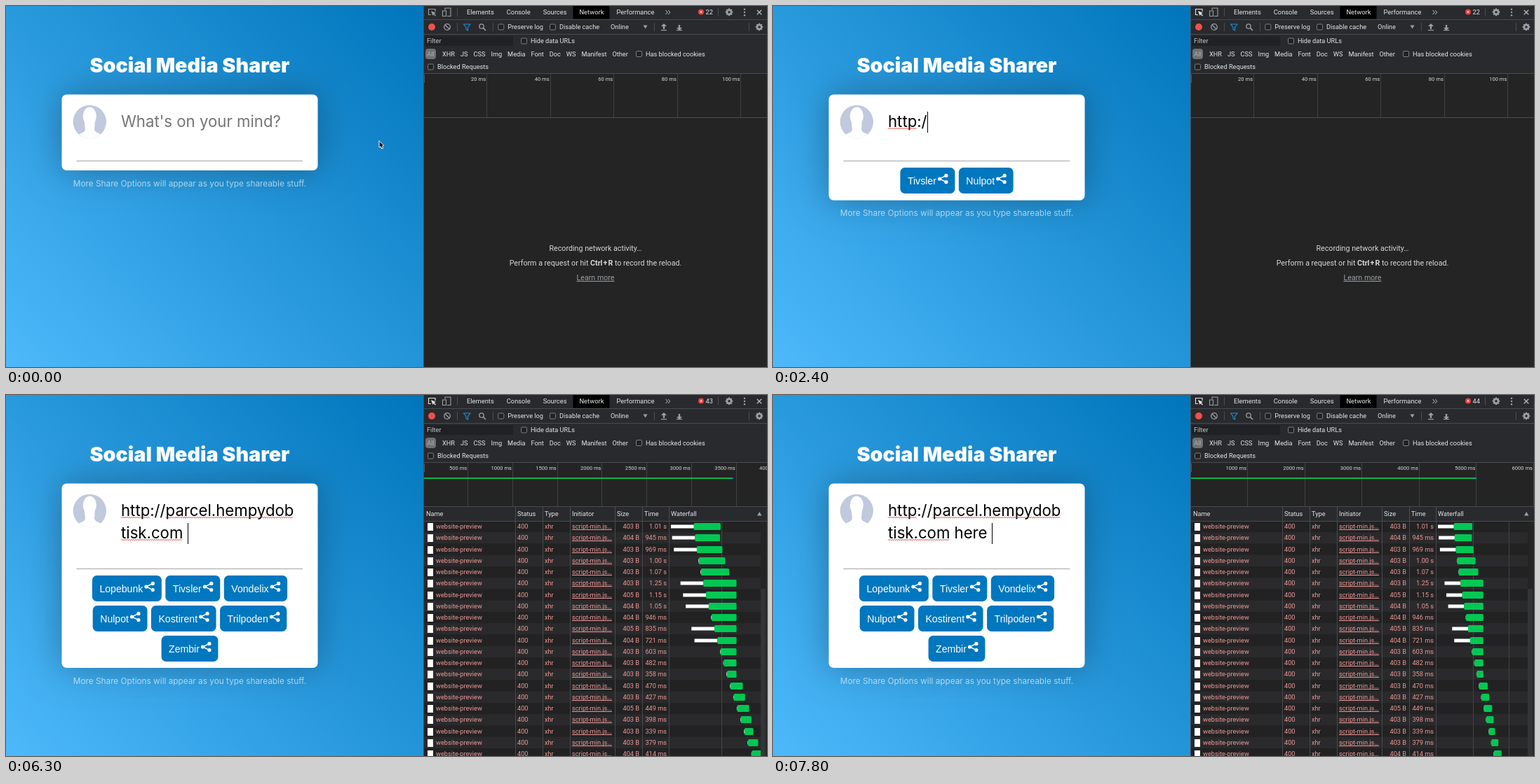
These frames come from a looping animation (1085x516 px, 8 s). An HTML page with a canvas:

```html
<!DOCTYPE html>
<html lang="en">
<head>
<meta charset="utf-8">
<title>Share box with network panel</title>
<style>
html, body { margin: 0; width: 100%; height: 100%; overflow: hidden; background: #242424; }
canvas { display: block; width: 1085px; height: 516px; }
</style>
</head>
<body>
<canvas id="stage"></canvas>
<script>
const W = 1085, H = 516, LOOP = 8000, SPLIT = 595, BUSY = 5400;
const canvas = document.getElementById('stage');
const c = canvas.getContext('2d');
const dpr = window.devicePixelRatio || 1;
canvas.width = W * dpr;
canvas.height = H * dpr;

const SANS = 'Inter, "Open Sans", sans-serif';
const UI = 'Roboto, "Liberation Sans", sans-serif';
const BTN = '"Liberation Sans", Arial, sans-serif';
const LIGHT = '#e3e5e8', GREY = '#9aa0a6', EDGE = '#494b4f', PINK = '#ee9896';

const LINES = ['http://parcel.hempydob', 'tisk.com here '];
const FEW = ['Tivsler', 'Nulpot'];
const ALL = ['Lopebunk', 'Tivsler', 'Vondelix', 'Nulpot', 'Kostirent', 'Trilpoden', 'Zembir'];
const COLS = { Name: 599, Status: 729, Type: 768, Initiator: 807, Size: 871, Time: 910, Waterfall: 948 };

// moments when the panel repaints, and the recording clock at a few of them
const REPAINTS = [5400, 5700, 6100, 6300, 6500, 6700, 6900, 7600, 7800];
const CLOCK = [[5400, 2010], [6300, 3463], [6900, 3953], [7800, 5000]];
const POINTER = [[400, 532, 192], [700, 367, 173], [1000, 367, 173], [1200, 607, 8]];

const clamp = (v, lo, hi) => Math.min(hi, Math.max(lo, v));
const within = (t, a, b) => t >= a && t < b;

// values on a polyline of [time, ...values]
function along(points, t) {
  let i = 0;
  while (i < points.length - 2 && t >= points[i + 1][0]) i++;
  const [a, b] = [points[i], points[i + 1]];
  const k = clamp((t - a[0]) / (b[0] - a[0]), 0, 1);
  return a.slice(1).map((v, j) => v + (b[j + 1] - v) * k);
}
function noise(n) {
  const v = Math.sin(n * 12.9898) * 43758.5453;
  return v - Math.floor(v);
}
function keyCount(t) {
  if (t < BUSY) return clamp(Math.ceil((t - 1400) / 160), 0, 6);
  if (t >= 7000) return 31 + clamp(Math.ceil((t - 7000) / 150), 0, 5);
  return t < 5700 ? 25 : t < 6100 ? 26 : t < 6300 ? 28 : 31;
}

/* ---- drawing helpers ---- */

function rect(x, y, w, h, fill) {
  c.fillStyle = fill;
  c.fillRect(x, y, w, h);
}
function round(x, y, w, h, r, fill) {
  c.beginPath();
  c.roundRect(x, y, w, h, r);
  c.fillStyle = fill;
  c.fill();
}
function disc(x, y, r, fill) {
  c.beginPath();
  c.arc(x, y, r, 0, 7);
  c.fillStyle = fill;
  c.fill();
}
function ring(x, y, r, color, w) {
  c.beginPath();
  c.arc(x, y, r, 0, 7);
  c.strokeStyle = color;
  c.lineWidth = w;
  c.stroke();
}
function path(pts, color, w, closed) {
  c.beginPath();
  pts.forEach(([x, y]) => c.lineTo(x, y));
  if (closed) c.closePath();
  c.strokeStyle = color;
  c.lineWidth = w;
  c.stroke();
}
function poly(pts, fill) {
  c.beginPath();
  pts.forEach(([x, y]) => c.lineTo(x, y));
  c.fillStyle = fill;
  c.fill();
}
function write(s, x, y, font, color, align = 'left') {
  c.font = font;
  c.fillStyle = color;
  c.textAlign = align;
  c.fillText(s, x, y);
}
function widthOf(s, font) {
  c.font = font;
  return c.measureText(s).width;
}
// panel text, placed by the middle of its capitals
function ui(s, x, y, color = LIGHT, align = 'left', size = 9.2) {
  write(s, x, y + size * 0.355, size + 'px ' + UI, color, align);
}
function flow(words, x, y, gap, size) {
  words.split(' ').forEach(s => {
    ui(s, x, y, LIGHT, 'left', size);
    x += widthOf(s, size + 'px ' + UI) + gap;
  });
}

/* ---- share page ---- */

function backdrop() {
  const g = c.createLinearGradient(19.75, 535.75, 575.25, -19.75);
  g.addColorStop(0, '#4db9fb');
  g.addColorStop(1, '#0075bb');
  rect(0, 0, SPLIT, H, g);
}

function avatar() {
  c.save();
  disc(119.3, 165.5, 23.7, '#c0c9dd');
  c.clip();
  c.beginPath();
  c.ellipse(119.3, 157.5, 9.6, 13, 0, 0, 7);
  c.fillStyle = '#fff';
  c.fill();
  poly([[111.5, 163], [113, 177], [111, 180], [104, 183.5], [102, 190],
    [137, 190], [135, 183.5], [128, 180], [126, 177], [127, 163]], '#fff');
  c.restore();
}

function shareIcon(x, y) {
  path([[x + 12, y - 4.6], [x + 2.6, y], [x + 12, y + 4.6]], '#fff', 1.5);
  [[12, -4.6], [2.6, 0], [12, 4.6]].forEach(([dx, dy]) => disc(x + dx, y + dy, 2.6, '#fff'));
}

// wraps the buttons into rows
function wrap(labels) {
  const rows = [];
  let room = 0;
  labels.forEach(label => {
    const w = widthOf(label, '14.1px ' + BTN) + 37;
    if (w > room) {
      rows.push([]);
      room = 322;
    }
    rows[rows.length - 1].push({ label, w });
    room -= w + 5.5;
  });
  return rows;
}

function buttons(rows, top) {
  rows.forEach((row, i) => {
    const y = top + i * 43;
    let x = 262 - (row.reduce((sum, b) => sum + b.w + 5.5, -5.5)) / 2;
    row.forEach(({ label, w }) => {
      round(x, y, w, 37, 6.5, '#0077be');
      write(label, x + 10.5, y + 23.5, '14.1px ' + BTN, '#fff');
      shareIcon(x + w - 24.5, y + 16);
      x += w + 5.5;
    });
  });
}

function squiggle(x, w, y) {
  const pts = [];
  for (let i = 0; i * 1.5 <= w; i++) pts.push([x + i * 1.5, y + (i % 2 ? 1.6 : 0)]);
  path(pts, '#e8302a', 0.9);
}

function typed(t) {
  const n = keyCount(t), split = LINES[0].length, x = 164, y = 173;
  const parts = [LINES[0].slice(0, n), LINES[1].slice(0, Math.max(0, n - split))];
  const font = '22.2px ' + SANS;
  const width = s => widthOf(s, font);
  if (n) parts.forEach((s, i) => write(s, x, y + i * 32, font, '#000'));
  else write("What's on your mind?", x, y, font, '#757575');
  if (t >= 2400) squiggle(x, width('http'), y + 1.3);
  if (t >= 6300) {
    const lead = width('http://');
    squiggle(x + lead, width(LINES[0]) - lead, y + 1.3);
    squiggle(x, width('tisk.com'), y + 33.3);
  }
  if (t >= 800 && !within(t, 1400, 1500) && !within(t, 6900, 7100)) {
    const low = n > split ? 1 : 0;
    rect(Math.round(x + width(parts[low])), 151 + low * 32, 1, 30, '#000');
  }
}

function page(t) {
  const rows = wrap(t < 1500 ? [] : t < BUSY ? FEW : ALL);
  const rule = t < BUSY ? 221 : 248;
  const bottom = rule + 14 + rows.length * 42.7;
  backdrop();
  c.save();
  c.shadowColor = 'rgba(0,0,0,.3)';
  c.shadowBlur = 50 * dpr;
  round(79.5, 126.5, 365, bottom - 126.5, 7, '#fff');
  c.restore();
  write('Social Media Sharer', 262, 95, '900 28.7px ' + SANS, '#fff', 'center');
  avatar();
  rect(100.5, rule, 322.5, 1, '#a5a5a5');
  buttons(rows, rule + 10);
  write('More Share Options will appear as you type shareable stuff.', 262, bottom + 22.7,
    '11.8px ' + SANS, 'rgba(255,255,255,.62)', 'center');
  typed(t);
}

/* ---- network panel ---- */

function divider(x, y) {
  rect(x, y - 6, 1, 12, '#4b4d51');
}
function checkbox(x, y, label) {
  c.beginPath();
  c.roundRect(x - 4, y - 4, 8, 8, 1.5);
  c.fillStyle = '#202124';
  c.fill();
  c.strokeStyle = '#85888c';
  c.lineWidth = 0.9;
  c.stroke();
  ui(label, x + 9.5, y);
}
function gear(x, y) {
  for (let i = 0; i < 4; i++) {
    const dx = Math.cos(i * Math.PI / 4) * 5.3, dy = Math.sin(i * Math.PI / 4) * 5.3;
    path([[x - dx, y - dy], [x + dx, y + dy]], GREY, 2.2);
  }
  disc(x, y, 4.2, GREY);
  disc(x, y, 1.8, '#292a2d');
}
function cross(x, y, r, color, w) {
  path([[x - r, y - r], [x + r, y + r]], color, w);
  path([[x + r, y - r], [x - r, y + r]], color, w);
}
function transfer(x, y, dir) {
  path([[x, y - 3 * dir], [x, y + 3 * dir]], GREY, 2.4);
  poly([[x - 4, y - dir], [x + 4, y - dir], [x, y - 5 * dir]], GREY);
  rect(x - 4, y + 4, 8, 1.2, GREY);
}

function tabs(t, errors) {
  const pin = t < 1200 ? GREY : '#e4e6e9';
  path([[606, 12.5], [602.5, 12.5], [602.5, 4.5], [612, 4.5], [612, 8]], pin, 1.1);
  poly([[606, 7], [613, 10], [610.5, 11], [613, 13.5], [612, 14.5], [609.5, 12], [608.5, 14]], pin);
  path([[626, 6], [626, 3], [634, 3], [634, 14.5], [629, 14.5]], GREY, 1.1);
  path([[622.5, 7], [627.5, 7], [627.5, 14.5], [622.5, 14.5]], GREY, 1.1, true);
  divider(643, 8.5);
  rect(808.5, 0, 52, 18.5, '#000');
  flow('Elements Console Sources Network Performance', 657, 8.5, 18, 9.35);
  [940.5, 944].forEach(x => path([[x, 6], [x + 2.7, 9], [x, 12]], GREY, 1.1));
  disc(991, 8.5, 4, '#e8403c');
  cross(991, 8.5, 1.5, '#fff', 0.9);
  ui(String(errors), 997.5, 8.7);
  divider(1015, 8.5);
  gear(1031, 8.7);
  [4.8, 9, 13.2].forEach(y => disc(1053, y, 1.2, GREY));
  cross(1074, 9, 3.2, '#b5b8bc', 1.3);
}

function toolbar() {
  disc(607, 30, 5, '#f0504c');
  ring(629, 30, 4.3, GREY, 1.3);
  path([[626, 27], [632, 33]], GREY, 1.3);
  path([[652.5, 26], [662, 26], [658.5, 30.5], [658.5, 35], [656, 33.5], [656, 30.5]], '#1a8fdd', 1.1, true);
  ring(678, 29, 3.2, GREY, 1.3);
  path([[680.3, 31.4], [684, 35]], GREY, 1.6);
  checkbox(705.8, 30, 'Preserve log');
  checkbox(779.5, 30, 'Disable cache');
  ui('Online', 862, 30);
  poly([[908.5, 27.5], [914.5, 27.5], [911.5, 32.5]], GREY);
  transfer(938, 30, 1);
  transfer(960, 30, -1);
  gear(1074, 30);
  [643, 694, 924, 1059].forEach(x => divider(x, 30));
}

function filters() {
  rect(597, 43, 126, 14, '#202124');
  ui('Filter', 600, 50, '#c3c6ca');
  checkbox(738.5, 50, 'Hide data URLs');
  round(598, 61, 15, 15, 4, '#6f7174');
  ui('All', 605.5, 68.5, '#aeb0b3', 'center');
  flow('XHR JS CSS Img Media Font Doc WS Manifest Other', 622, 68.5, 8, 9.2);
  checkbox(902.5, 68.5, 'Has blocked cookies');
  checkbox(605.5, 87, 'Blocked Requests');
}

// smallest 1-2-5 step that leaves room for a label
function axisStep(pxPerMs) {
  for (let p = 10; ; p *= 10) {
    for (const m of [1, 2, 5]) if (p * m * pxPerMs >= 50) return p * m;
  }
}

// the axis widens by a quarter whenever the recording outgrows it
function overview(clock, busy) {
  const range = 2460 * 1.25 ** Math.ceil(Math.log(clock / 2460) / Math.log(1.25));
  const px = 490 / range, step = axisStep(px);
  rect(SPLIT, 97, 490, 62, '#242424');
  for (let ms = step; ms < range + step; ms += step) {
    const x = SPLIT + ms * px;
    rect(Math.floor(x), 97, 1, 62, '#3f4144');
    ui(ms + ' ms', x - 1.5, 104, '#d5d7da', 'right', 7.6);
  }
  rect(SPLIT, 98, 1.5, 12, '#85888c');
  if (busy) {
    rect(596, 118, clock * px - 1, 1.8, '#00c853');
    rect(SPLIT + clock * px - 3, 118, 3, 1.8, '#1a8ae8');
  }
}

function emptyNote() {
  const mid = 840.5, ink = '#d5d7da';
  const fonts = ['10.7px ' + UI, 'bold 10.7px ' + UI];
  const parts = ['Perform a request or hit ', 'Ctrl\u200a+\u200aR', ' to record the reload.'];
  const widths = parts.map((s, i) => widthOf(s, fonts[i % 2]));
  let x = mid - widths.reduce((a, b) => a + b) / 2;
  ui('Recording network activity…', mid, 346, ink, 'center', 10.7);
  parts.forEach((s, i) => {
    write(s, x, 370.8, fonts[i % 2], ink);
    x += widths[i];
  });
  ui('Learn more', mid, 388, GREY, 'center', 10.7);
  rect(813.5, 393, 54, 1, GREY);
}

// Six preflights, then requests that start ever further apart.
// Some wait for a free connection; those in the middle finish together.
function request(i) {
  const unit = 0.0505, early = i < 6;
  const start = early ? 11 + i * 6 : 44 + 111 * ((i - 6) / 20) ** 1.3;
  const ms = i < 11 ? 920 + noise(i) * 150 : i < 20 ? (125.5 - start) / unit : 310 + noise(i) * 210;
  const waits = !early && i < 17 && (i - 6) % 4.5 < 3;
  return {
    early, start, ms: Math.round(ms),
    end: start + ms * unit,
    queued: early ? start : start - (waits ? 44 : 1),
    bytes: early ? 0 : 403 + Math.floor(noise(i + 40) * 3)
  };
}

function bar(r, y, scale) {
  const [q, a, b] = [r.queued, r.start, r.end].map(v => 948 + v * scale);
  rect(q, y - 2.5, a - q, 5, '#fff');
  round(a, y - 5, b - a, 10, 1.5, '#00c853');
}

function row(r, y, pending) {
  const ink = r.early || pending ? LIGHT : PINK;
  const time = r.ms < 1000 ? r.ms + ' ms' : (r.ms / 1000).toFixed(2) + ' s';
  rect(601, y - 5, 8, 11, '#fff');
  ui('website-preview', 613, y, ink);
  ui(r.early ? '200' : pending ? '(pend…' : '400', COLS.Status, y, ink);
  ui(r.early ? 'json' : 'xhr', COLS.Type, y, ink);
  if (r.early) ui('Other', COLS.Initiator, y, GREY);
  else {
    ui('script-min.js…', COLS.Initiator, y, ink);
    rect(COLS.Initiator, y + 4, 57, 1, ink);
  }
  ui((pending ? 0 : r.bytes) + ' B', 903, y, ink, 'right');
  ui(pending ? 'Pendi…' : time, 942, y, ink, 'right');
}

function table(t, clock) {
  const pitch = 16.25, scale = Math.min(1, 2580 / clock);
  const scroll = clamp(keyCount(t) - 25, 0, 6);
  const gap = (scale > 0.9 ? 49.5 : 99) * scale;
  const lines = Object.values(COLS).slice(1).map(x => x - 3);
  const rows = Array.from({ length: 21 }, (_, k) => ({
    r: request(scroll + k), y: Math.round(188 + k * pitch), pending: k === 20 && t < 6300
  }));
  rows.forEach((_, k) => rect(596, 180 + k * pitch, 480, pitch, k + scroll & 1 ? '#2a2a2c' : '#222223'));
  for (let x = 947 + gap; x < 1076; x += gap) rect(Math.floor(x), 180, 1, H - 180, '#424447');
  lines.forEach(x => rect(x, 160, 1, H - 160, '#47494d'));
  rows.forEach(({ r, y, pending }) => {
    row(r, y, pending);
    if (!pending) bar(r, y, scale);
  });
  rect(1076, 180, 9, H - 180, '#242424');
  const top = 211 + scroll * 11;
  rect(1076, top, 7, H - top, '#333437');
  rect(SPLIT, 160, 490, 20, '#292a2d');
  rect(SPLIT, 180, 490, 1, EDGE);
  lines.forEach(x => rect(x, 160, 1, 20, EDGE));
  Object.entries(COLS).forEach(([s, x]) => ui(s, x, 170));
  poly([[1071, 172.5], [1077.5, 172.5], [1074.2, 167]], GREY);
}

function panel(t) {
  const busy = t >= BUSY;
  const clock = busy ? along(CLOCK, REPAINTS.filter(r => r <= t).pop())[0] : 100;
  const errors = busy ? Math.min(44, 36 + Math.floor((clock - 2010) / 207)) : 22;
  c.save();
  c.beginPath();
  c.rect(SPLIT, 0, W - SPLIT, H);
  c.clip();
  rect(SPLIT, 0, W - SPLIT, H, '#242424');
  rect(SPLIT, 0, W - SPLIT, 97, '#292a2d');
  tabs(t, errors);
  toolbar();
  filters();
  overview(clock, busy);
  if (busy) table(t, clock);
  else emptyNote();
  [19, 40, 96, 159].forEach(y => rect(SPLIT, y, 490, 1, EDGE));
  rect(SPLIT, 0, 1, H, '#4a4c50');
  c.restore();
}

function pointer(t) {
  if (t >= 1200) return;
  const [x, y] = along(POINTER, t);
  if (x < 423) {
    rect(x - 0.5, y - 7, 1, 14, '#111');
    [-8, 7].forEach(dy => rect(x - 3, y + dy, 6, 1, '#111'));
    return;
  }
  const pts = [[0, 0], [0, 9.5], [2.3, 8.3], [3.8, 11.5], [5.6, 10.7], [4.6, 7.5], [6.6, 6.6]]
    .map(([dx, dy]) => [x + dx, y + 0.6 + dy]);
  poly(pts, '#111');
  path(pts, '#fff', 1, true);
}

function draw() {
  const t = Math.floor(performance.now() % LOOP / 100) * 100;
  c.setTransform(dpr, 0, 0, dpr, 0, 0);
  page(t);
  panel(t);
  pointer(t);
  requestAnimationFrame(draw);
}
draw();
</script>
</body>
</html>
```
